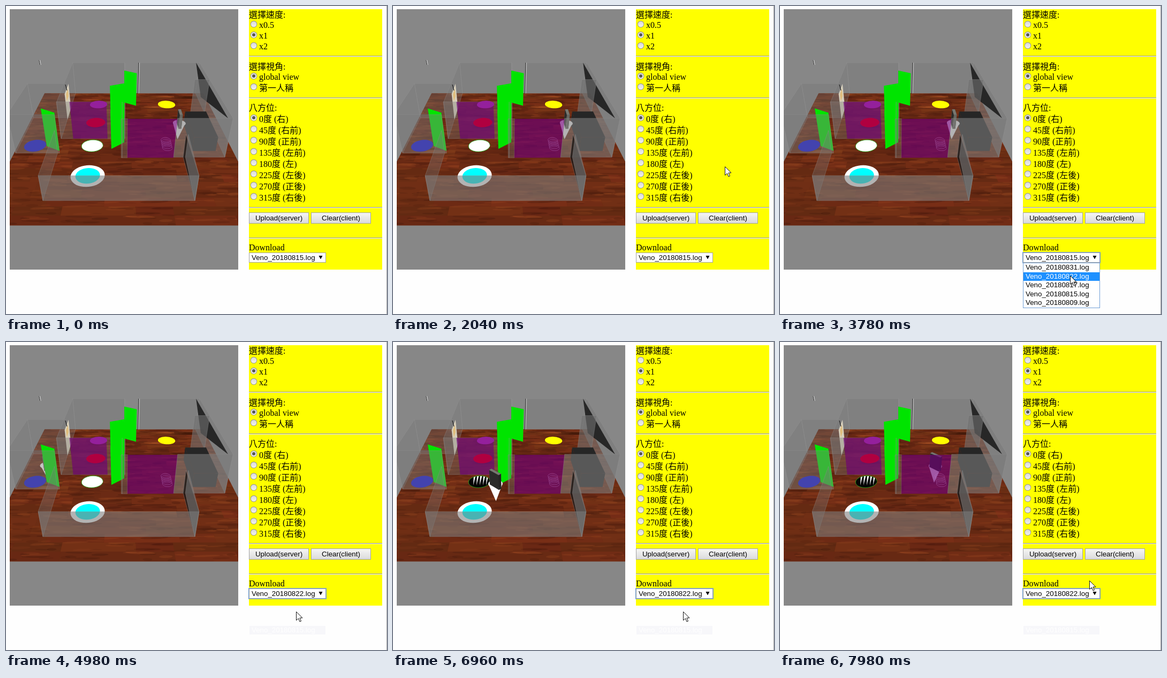
An HTML page with a canvas for the animation above (8000 ms loop, 712 px wide and 576 px high).

```html
<!DOCTYPE html>
<html>
<head>
<meta charset="utf-8">
<style>
html, body { margin: 0; width: 100%; height: 100%; overflow: hidden; background: #fefefe; }
canvas { display: block; }
</style>
</head>
<body>
<canvas id="stage" width="712" height="576"></canvas>
<script>
const W = 712, H = 576, LOOP = 8000, STEP = 60;
const SERIF = '16px "Liberation Serif", "Noto Sans CJK TC", "Noto Sans CJK JP", serif';
const SANS = '13.333px "Liberation Sans", Arial, sans-serif';
const stage = document.getElementById('stage').getContext('2d');
let g = stage;

let seed = 7;
const rnd = () => (seed = (seed * 16807) % 2147483647) / 2147483647;
const range = n => [...Array(n).keys()];

// Camera looking down on the flat: x to the right, z away, h up
const EYE = 10, FOCAL = 588, SIN = 0.54, COS = 0.8415;
function project(x, z, h = 0) {
  const depth = z * COS + (EYE - h) * SIN;
  const drop = (EYE - h) * COS - z * SIN;
  return [220.5 + FOCAL * x / depth, 249.5 + FOCAL * drop / depth];
}

function trace(points) {
  g.beginPath();
  for (const p of points) g.lineTo(...p);
  g.closePath();
}
function fill(color, points, edge) {
  trace(points);
  g.fillStyle = color;
  g.fill();
  if (edge) {
    g.strokeStyle = edge;
    g.lineWidth = 1;
    g.stroke();
  }
}
function line(color, points) {
  g.beginPath();
  for (const p of points) g.lineTo(...p);
  g.strokeStyle = color;
  g.lineWidth = 1;
  g.stroke();
}
function circle(color, x, y, r) {
  g.beginPath();
  g.arc(x, y, r, 0, 7);
  g.fillStyle = color;
  g.fill();
}
function rect(color, x, y, w, h) {
  g.fillStyle = color;
  g.fillRect(x, y, w, h);
}
function box(border, color, x, y, w, h) {
  rect(border, x, y, w, h);
  rect(color, x + 1, y + 1, w - 2, h - 2);
}
function text(s, x, y, font = SERIF, color = '#000', align = 'left') {
  g.font = font;
  g.fillStyle = color;
  g.textAlign = align;
  g.fillText(s, x, y);
}
function layer(draw) {
  const c = document.createElement('canvas');
  c.width = W;
  c.height = H;
  g = c.getContext('2d');
  draw();
  g = stage;
  return c;
}
function clipView() {
  g.beginPath();
  g.rect(7, 6, 427, 487);
  g.clip();
}
// Linear interpolation over rows of [time, a, b]
function at(keys, t) {
  const i = Math.max(1, keys.findIndex(k => t <= k[0]));
  const [t0, ...a] = keys[i - 1], [t1, ...b] = keys[i];
  const k = Math.min(1, Math.max(0, (t - t0) / (t1 - t0)));
  return a.map((v, n) => v + (b[n] - v) * k);
}

const TALL = 2.4, LOW = 1.45;
const FAR = 22.1, SIDE = 6.05;
const GREEN = '#00e400', PANE = 'rgba(118,118,118,.36)', FRONT = 'rgba(125,125,125,.58)';
const PURPLE = 'rgba(112,0,118,.66)', EDGE = 'rgba(150,150,150,.35)';

function upright(color, x1, z1, x2, z2, top = TALL, base = 0, edge) {
  fill(color, [project(x1, z1, base), project(x2, z2, base), project(x2, z2, top), project(x1, z1, top)], edge);
}
const wall = (color, x1, z1, x2, z2, top) => upright(color, x1, z1, x2, z2, top, 0, EDGE);

function ring(x, z, r, h = 0) {
  return range(40).map(i => project(x + r * Math.cos(i * Math.PI / 20), z + r * Math.sin(i * Math.PI / 20), h));
}
const SPOT = 0.61, AISLE = -1.81, HALL = 14.93;
const spot = (color, x, z, r = SPOT) => fill(color, ring(x, z, r));

function wood() {
  const row = 0.55;
  fill('#6c2a12', [[-1, 9], [1, 9], [1, FAR], [-1, FAR]].map(([x, z]) => project(x * SIDE, z)));
  g.save();
  trace([[-1, 9.02], [1, 9.02], [1, FAR], [-1, FAR]].map(([x, z]) => project(x * SIDE, z)));
  g.clip();
  for (let z = 9; z < FAR; z += row) {
    for (let x = -SIDE - rnd() * 2; x < SIDE;) {
      const len = 1.5 + rnd() * 2;
      const tone = `hsl(${14 + rnd() * 4},69%,${23 + rnd() * 5}%)`;
      fill(tone, [project(x, z), project(x + len, z), project(x + len, z + row), project(x, z + row)]);
      for (let n = 0; n < 7; n++) {
        const [sx, sy] = project(x + rnd() * len, z + rnd() * row);
        g.globalAlpha = 0.06 + rnd() * 0.13;
        g.beginPath();
        g.ellipse(sx, sy, 8 + rnd() * 20, 1 + rnd() * 1.8, (rnd() - 0.5) * 0.12, 0, 7);
        g.fillStyle = rnd() < 0.45 ? '#c8642e' : '#200904';
        g.fill();
      }
      g.globalAlpha = 1;
      x += len;
    }
  }
  g.restore();
}

function block(color, x1, z1, x2, z2, h) {
  upright(color, x1, z1, x2, z1, h);
  upright(color, x1, z1, x1, z2, h);
  fill(color, [project(x1, z1, h), project(x2, z1, h), project(x2, z2, h), project(x1, z2, h)]);
}

const back = layer(() => {
  clipView();
  rect('#878787', 7, 6, 427, 487);
  wood();
  line('#222', [[62, 101], [64, 110]]);
  line('#eee', [[63, 101], [65, 110]]);

  // left room
  wall(PANE, -5.97, 18.24, -3.55, 18.24);
  wall(PANE, -5.97, 14.19, -5.97, 18.24);
  spot('#1414d8', -5.07, HALL);

  // right room
  wall(PANE, 1.06, FAR, 5.45, FAR);
  line('#333', [project(1.06, FAR), project(1.06, FAR, TALL)]);
  line('#ccc', [project(1.12, FAR), project(1.12, FAR, TALL)]);
  spot('#ffff00', 3.03, 20.2);
  wall('rgba(122,122,122,.6)', 5.45, 13.8, 5.45, FAR);
  fill('rgba(24,24,24,.85)', [project(5.2, FAR, TALL), project(5.2, 13.8, TALL), project(5.2, 19.5, 0.9)]);
  wall('rgba(112,112,112,.6)', 4.5, 18.9, 5.45, 18.9);
  block('#262626', 3.8, 14.4, 5.1, 17.4, 0.9);

  // middle room
  wall(PANE, -3.7, FAR, 0.05, FAR);
  wall(PANE, -3.7, 15.67, -3.7, FAR);
  wall(PANE, 0.05, 15.67, 0.05, FAR);
  upright('#d8d0bc', -3.65, 17.8, -3.65, 19.4, 1.9, 0.1);
  upright('#e0bd7c', -3.65, 18.2, -3.65, 19, 1.7, 1.2);
  wall(PANE, -3.72, 15.67, 0.05, 15.67);
  upright(PURPLE, -3, 15.67, -0.97, 15.67);
  spot('#94209c', AISLE, 20.2);
  spot('#b00040', AISLE, 17.6);
  line('#111', [[111, 147], [114, 158]]);

  upright(GREEN, 0.02, 20.5, 0.85, 20);
  upright(GREEN, -0.86, 17.9, 0.03, 18.3);
  upright(GREEN, -0.71, 14.6, 0.015, 15.27);

  spot('#fff', AISLE, 12.24, 0.85);
  spot('#00ffff', AISLE, 12.24);
});

const front = layer(() => {
  clipView();
  upright(GREEN, -4.4, 14.88, -3.59, 14.4);
  wall('rgba(125,125,125,.45)', -5.97, 14.19, -3.55, 14.19);

  // middle partition
  wall(PANE, -0.1, 13.75, -0.1, 15.67);
  wall(PANE, -0.15, 13.75, 0.18, 13.75);
  upright(PURPLE, 0.18, 13.75, 2.68, 13.75);
  for (const i of range(5)) line('rgba(190,120,200,.4)', ring(2.45, 14.7 + i * 0.2, 0.28));
  wall(FRONT, 2.68, 13.8, 5.45, 13.8);

  // front room
  wall(PANE, -3.66, 10.46, -3.66, 14.2, LOW);
  wall('rgba(25,22,20,.8)', 3.2, 10.46, 3.2, 13.8, LOW);
  wall(FRONT, -3.66, 10.46, 3.2, 10.46, LOW);
  wall(FRONT, 3.2, 10.46, 3.32, 13.8, LOW);
});

function radio(y, on) {
  const fade = g.createLinearGradient(0, y - 6, 0, y + 6);
  fade.addColorStop(0, '#d8d8d8');
  fade.addColorStop(1, '#f2f2f2');
  circle('#929292', 463, y, 6.2);
  circle(fade, 463, y, 5.3);
  if (on) circle('#555', 463, y, 3);
}
function option(label, y, on) {
  radio(y, on);
  text(label, 473, y + (/[^ -~]/.test(label) ? 8 : 7));
}
function button(label, x) {
  const fade = g.createLinearGradient(0, 386, 0, 407);
  fade.addColorStop(0, '#f6f6f6');
  fade.addColorStop(1, '#dadada');
  box('#a2a2a2', fade, x, 386, 112, 21);
  text(label, x + 56, 401, SANS, '#000', 'center');
}

const panel = layer(() => {
  rect('#a8a8a8', 711, 0, 1, H);
  rect('#ffff00', 454, 6, 249, 487);
  for (const y of [93, 171, 376, 433]) {
    rect('#9a9a9a', 454, y, 249, 1);
    rect('#eee', 454, y + 1, 249, 1);
  }
  text('選擇速度:', 454, 22);
  ['x0.5', 'x1', 'x2'].forEach((s, i) => option(s, 34 + 20 * i, i === 1));
  text('選擇視角:', 454, 119);
  ['global view', '第一人稱'].forEach((s, i) => option(s, 131 + 20 * i, i === 0));
  text('八方位:', 454, 196);
  const names = ['右', '右前', '正前', '左前', '左', '左後', '正後', '右後'];
  names.forEach((s, i) => option(`${i * 45}度 (${s})`, 209 + 21 * i, i === 0));
  button('Upload(server)', 454);
  button('Clear(client)', 570);
  text('Download', 454, 457);
});

const logName = day => `Veno_2018${day}.log`;
const DAYS = ['0831', '0822', '0817', '0815', '0809'];
const OPEN = 3120, PICK = 4260, MOVE = 4680;

function picker(t, cy) {
  const picked = t >= PICK;
  if (t >= OPEN) rect('#6ea3dc', 453, 460, 146, 21);
  box('#a0a0a0', '#fff', 454, 461, 144, 19);
  text(logName(DAYS[picked ? 1 : 3]), 459, 475, SANS);
  fill('#000', [[584.5, 467], [591.5, 467], [588, 473.5]]);
  if (picked) {
    rect('#f7f7fa', 455, 531, 142, 16);
    text(logName(DAYS[3]), 459, 543, SANS, '#fff');
  } else if (t >= OPEN) {
    box('#6f9fd6', '#fff', 454, 480, 144, 85);
    const hover = cy < 481 ? 3 : Math.floor((cy - 481) / 16.6);
    DAYS.forEach((d, i) => {
      const y = Math.round(481 + 16.6 * i);
      if (i === hover) rect('#1e90ff', 455, y, 142, 16);
      text(logName(d), 459, y + 12, SANS, i === hover ? '#fff' : '#000');
    });
  }
}

// time, x, z on the floor
const WALK = [
  [MOVE, -5.2, HALL], [5770, AISLE, HALL], [6300, -2.05, 13.3], [6900, -0.95, 13], [7980, 2.05, 14.83]
];

// Heading snaps to eight directions
function heading(t) {
  const [x0, z0] = at(WALK, t), [x1, z1] = at(WALK, t + 10);
  const eighth = Math.PI / 4;
  return Math.round(Math.atan2(z1 - z0, x1 - x0) / eighth) * eighth;
}

function walker(x, z, turn) {
  const top = 1.1;
  fill('#fff', ring(x, z, 0.36, top));
  fill('#fff', [project(x - 0.36, z, top), project(x + 0.36, z, top), project(x, z)]);

  // Thin board standing across the walking direction
  const c = Math.cos(turn), s = Math.sin(turn), half = 0.34, thick = 0.08;
  const corners = [[1, 1], [1, -1], [-1, -1], [-1, 1]].map(([a, b]) =>
    [x + s * half * a + c * thick * b, z - c * half * a + s * thick * b]);
  range(4)
    .map(i => [...corners[i], ...corners[(i + 1) % 4], i % 2 ? '#2b2b29' : '#66665f'])
    .sort((a, b) => b[1] + b[3] - a[1] - a[3])
    .forEach(([x1, z1, x2, z2, color], i) => {
      const shade = i === 3 && Math.abs(c) < 0.9 ? '#242422' : color;
      upright(shade, x1, z1, x2, z2, 1.8, 0.92);
    });
  fill('#777770', corners.map(p => project(...p, 1.8)));
}

function target(t) {
  const dark = t >= 6060;
  spot(dark ? '#050505' : '#fff', AISLE, HALL);
  g.save();
  g.clip();
  if (dark) {
    for (const i of range(5)) {
      const x = 151 + i * 6;
      fill('#fff', [[x, 248], [x + 4, 248], [x - 1, 268]]);
    }
  } else if (t >= 5520) {
    line('#35b51c', range(9).map(i => [142 + 3 * i, 258 - i % 2 * 6]));
  }
  g.restore();
  line('#2d9a18', ring(AISLE, HALL, SPOT));
}

const POINTER = [
  [60, 683, 0], [450, 541, 247], [840, 399, 0], [900, 559, 0], [1080, 500, 170],
  [1260, 457, 100], [1680, 457, 94], [2040, 620, 300], [2520, 545, 486], [2700, 535, 470],
  [3480, 535, 470], [3780, 542, 504], [7080, 542, 504], [7700, 586, 462], [7980, 578, 446]
];
const ARROW = [[0, 0], [0, 16], [4, 12.5], [6.5, 18.5], [9, 17.5], [6.5, 11.5], [11.5, 11.5]];

function pointer(t, x, y) {
  if (t < 60) return;
  if (t > 1140 && t < 1740) {
    line('#222', [[x - 3, y - 3.5], [x + 4, y - 3.5]]);
    line('#222', [[x + 0.5, y - 4], [x + 0.5, y + 5]]);
    return;
  }
  g.save();
  g.translate(Math.round(x) + 0.5, Math.round(y) + 0.5);
  fill('#fff', ARROW, '#111');
  g.restore();
}

function draw(t) {
  const [cx, cy] = at(POINTER, t);
  rect('#fefefe', 0, 0, W, H);
  g.drawImage(back, 0, 0);
  target(t);
  if (t < MOVE) walker(3.15, 15.6, 0);
  else walker(...at(WALK, t), heading(Math.min(t, 7960)));
  g.drawImage(front, 0, 0);
  g.drawImage(panel, 0, 0);
  picker(t, cy);
  pointer(t, cx, cy);
}

function tick() {
  const t = performance.now() % LOOP;
  draw(Math.floor(t / STEP) * STEP);
  requestAnimationFrame(tick);
}
tick();
</script>
</body>
</html>
```
